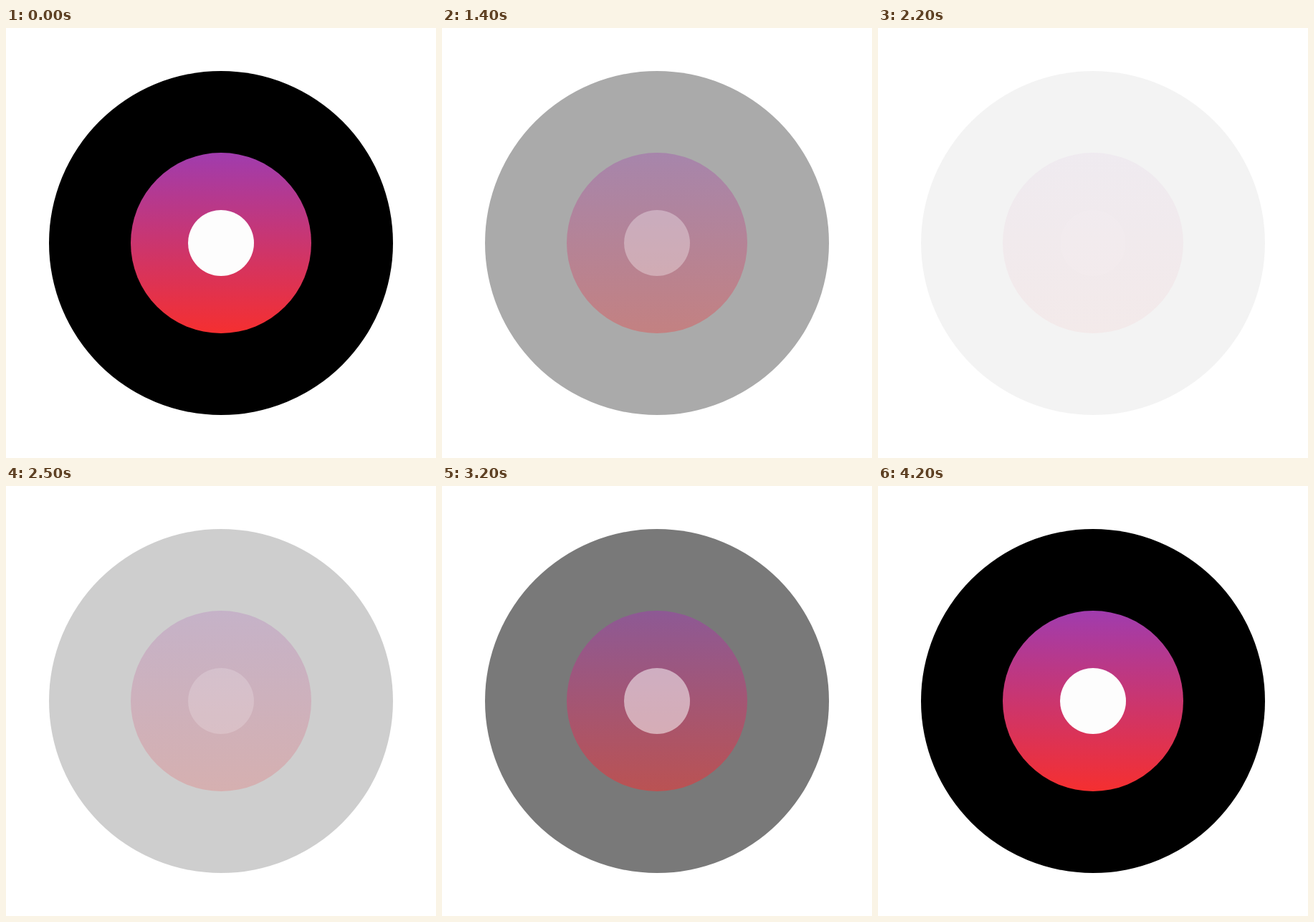
These frames come from a looping animation (600x600 px, 4.3 s). An HTML page:

```html
<!DOCTYPE html>
<html lang="en">
<head>
<meta charset="utf-8">
<title>Fading disc</title>
<style>
  html, body { margin: 0; height: 100%; overflow: hidden; background: #fff; }
  svg { display: block; width: 100%; height: 100%; }
</style>
</head>
<body>
<svg viewBox="0 0 600 600">
  <defs>
    <linearGradient id="label" x1="0" y1="0" x2="0" y2="1">
      <stop offset="0" stop-color="#a03cae"/>
      <stop offset="1" stop-color="#f52f30"/>
    </linearGradient>
  </defs>
  <circle cx="300" cy="300" r="240"/>
  <circle cx="300" cy="300" r="126" fill="url(#label)"/>
  <circle cx="300" cy="300" r="46" fill="#fdfdfd"/>
</svg>
<script>
  const LOOP = 4300, STEP = 100, HALF = 2100;
  const circles = document.querySelectorAll('circle');

  // Each circle fades on its own, so the lower ones show through.
  function draw(now) {
    const time = Math.floor((now % LOOP) / STEP) * STEP;
    const opacity = Math.abs(time - HALF) / HALF;
    for (const circle of circles) circle.style.opacity = opacity;
    requestAnimationFrame(draw);
  }
  draw(performance.now());
</script>
</body>
</html>
```
